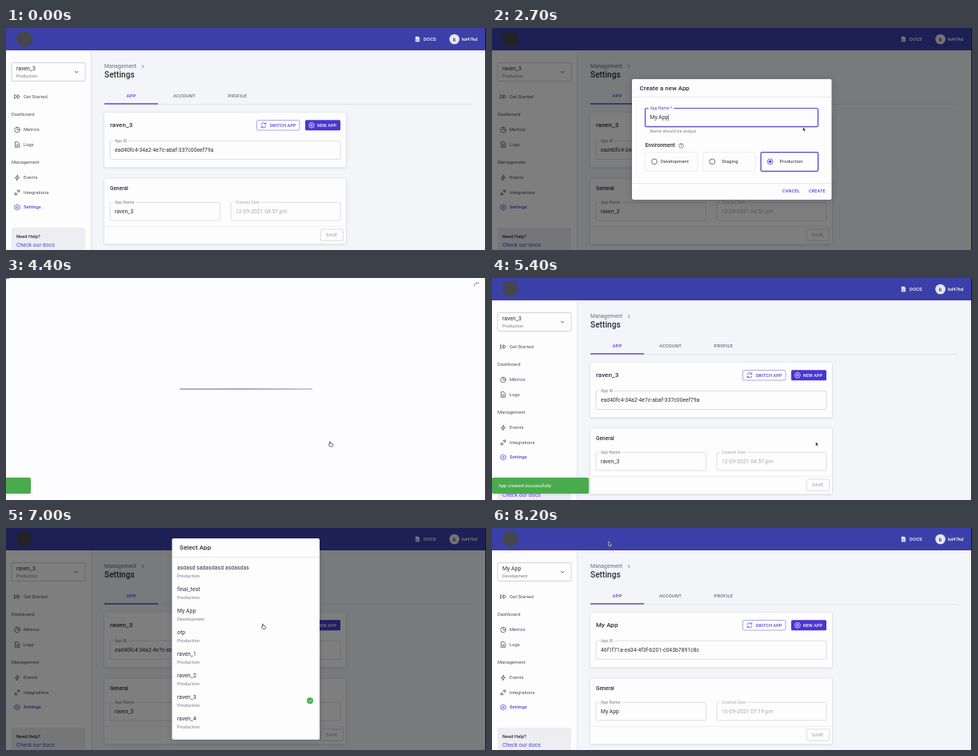
Recreate the animation shown at these times as an HTML page with a canvas. Size 600 by 278 pixels, loop 8.3 s.

```html
<!DOCTYPE html>
<html lang="en">
<head>
<meta charset="utf-8">
<title>App settings</title>
<style>
  html, body { margin: 0; width: 100%; height: 100%; overflow: hidden; background: #f4f5f8; }
  canvas { display: block; width: 600px; height: 278px; }
</style>
</head>
<body>
<canvas></canvas>
<script>
const LOOP = 8300, STEP = 100;
const INK = '#2b2d38', GREY = '#777a84', PALE = '#a9abb3', LINE = '#c9cad0', PURPLE = '#5443d6';
const canvas = document.querySelector('canvas');
const ctx = canvas.getContext('2d');
const ratio = window.devicePixelRatio || 1;
canvas.width = 600 * ratio;
canvas.height = 278 * ratio;
ctx.scale(ratio, ratio);

const clamp = v => Math.max(0, Math.min(1, v));
const within = (t, from, to) => t >= from && t < to;

function box(x, y, x2, y2, fill, stroke, lineWidth = 0.6, radius = 1.5) {
  ctx.beginPath();
  ctx.roundRect(x, y, x2 - x, y2 - y, radius);
  if (fill) { ctx.fillStyle = fill; ctx.fill(); }
  if (stroke) { ctx.strokeStyle = stroke; ctx.lineWidth = lineWidth; ctx.stroke(); }
}

function rect(x, y, w, h, fill) {
  ctx.fillStyle = fill;
  ctx.fillRect(x, y, w, h);
}

function shadowed(draw, blur = 3) {
  ctx.save();
  ctx.shadowColor = 'rgba(40,40,80,.22)';
  ctx.shadowBlur = blur;
  ctx.shadowOffsetY = 0.6;
  draw();
  ctx.restore();
}

function text(s, x, y, size, color = INK, weight = 400, spacing = 0.01) {
  ctx.font = `${weight} ${size}px Roboto, sans-serif`;
  ctx.letterSpacing = size * spacing + 'px';
  ctx.textBaseline = 'middle';
  ctx.fillStyle = color;
  ctx.fillText(s, x, y);
  return ctx.measureText(s).width;
}

const caps = (s, x, y, size, color) => text(s, x, y, size, color, 500, 0.029);

function icon(d, x, y, color, fill, lineWidth = 0.75) {
  const path = new Path2D(d);
  ctx.save();
  ctx.translate(x, y);
  if (fill) { ctx.fillStyle = fill; ctx.fill(path); }
  if (color) { ctx.strokeStyle = color; ctx.lineWidth = lineWidth; ctx.stroke(path); }
  ctx.restore();
}

function disc(x, y, r, fill, stroke, lineWidth = 0.8) {
  ctx.beginPath();
  ctx.arc(x, y, r, 0, 7);
  if (fill) { ctx.fillStyle = fill; ctx.fill(); }
  if (stroke) { ctx.strokeStyle = stroke; ctx.lineWidth = lineWidth; ctx.stroke(); }
}

// Outlined text field with its label set into the top border
function field(label, value, x, y, x2, y2, { color = INK, focus = false } = {}) {
  box(x, y, x2, y2, null, focus ? PURPLE : LINE, focus ? 1.2 : 0.6);
  ctx.font = '400 5px Roboto, sans-serif';
  ctx.letterSpacing = '0.1px';
  rect(x + 4, y - 1.5, ctx.measureText(label).width + 4, 3, '#fdfdfe');
  text(label, x + 6, y, 5, focus ? PURPLE : color === INK ? GREY : PALE, 400, 0.02);
  return text(value, x + 6, (y + y2) / 2 + 0.4, 6.7, color);
}

const RING = 'M3.3 0A3.3 3.3 0 1 1 -3.3 0A3.3 3.3 0 1 1 3.3 0';
const ICONS = {
  start: 'M-3.5 -2.5L-.3 0L-3.5 2.5ZM.3 -2.5L3.5 0L.3 2.5Z',
  metrics: RING + 'M0 -3.3V0H3.3',
  logs: 'M-2.6 -3.3H1L2.6 -1.5V3.3H-2.6ZM-1.3 0H1.3M-1.3 1.6H1.3',
  events: 'M.8 -3.5L-2.7 .6H0L-.8 3.5L2.7 -.6H0Z',
  links: 'M-3.5 2.6L-1.5 .7M3.5 -2.6L1.5 -.7M-2 .2L.2 2.2L-1 3H-2.5L-2.8 1ZM2 -.2L-.2 -2.2L1 -3H2.5L2.8 -1Z',
  gear: 'M0 -3.6L1.4 -2.7L3.2 -1.8V1.8L1.4 2.7L0 3.6L-1.4 2.7L-3.2 1.8V-1.8L-1.4 -2.7ZM1.2 0A1.2 1.2 0 1 1 -1.2 0A1.2 1.2 0 1 1 1.2 0',
  sync: 'M-3 -.5A3 3 0 0 1 2.4 -1.8M3 .5A3 3 0 0 1 -2.4 1.8M2.8 -3.4V-1.5H.8M-2.8 3.4V1.5H-.8',
  plus: RING + 'M-1.8 0H1.8M0 -1.8V1.8',
  down: 'M-2.2 -1L0 1.2L2.2 -1',
  right: 'M-1 -2L1 0L-1 2',
  tick: 'M-1.7 0L-.4 1.3L1.8 -1.1'
};

const NAV = [
  ['Get Started', 86, 'start'], ['Dashboard', 108], ['Metrics', 127.5, 'metrics'], ['Logs', 146, 'logs'],
  ['Management', 168.5], ['Events', 187.5, 'events'], ['Integrations', 206, 'links'], ['Settings', 224.5, 'gear']
];

const APPS = {
  old: { name: 'raven_3', env: 'Production', id: 'ead40fc4-34a2-4e7c-abaf-337c00eef79a', date: '12-09-2021 04:57 pm' },
  fresh: { name: 'My App', env: 'Development', id: '46f1f71a-ea34-4f3f-b201-c043b7891c8c', date: '16-09-2021 07:19 pm' }
};

function drawHeader() {
  rect(0, 0, 600, 28, '#3b40a9');
  disc(23, 13.5, 10, '#45464e');
  icon('M-2.6 -3.4H1L2.8 -1.6V3.4H-2.6ZM-1.3 .1H1.4M-1.3 1.6H1.4', 514.3, 14, '#3b40a9', '#fff', 0.6);
  caps('DOCS', 522, 14.3, 5.8, '#fff');
  disc(560.5, 14, 6.3, '#e6e6ee');
  text('k', 558.4, 14.2, 8, '#333645');
  text('kd47kd', 570, 14.3, 5.8, '#fff', 500);
}

function drawSidebar(app) {
  shadowed(() => rect(0, 28, 106, 250, '#fdfdfe'), 2);
  box(7, 43.5, 99, 66.5, null, LINE, 0.8);
  text(app.name, 13, 50.8, 6.8);
  text(app.env, 13, 60, 5.2, GREY, 400, 0.02);
  icon(ICONS.down, 88, 55, '#555862', null, 0.9);
  for (const [label, y, name] of NAV) {
    const color = label === 'Settings' ? PURPLE : '#4b4e59';
    if (name) icon(ICONS[name], 14, y, color);
    text(label, name ? 22 : 7, y, 5.8, color, label === 'Settings' ? 500 : 400);
  }
  box(7, 250, 99, 284, '#ededf2');
  text('Need Help?', 13, 261.7, 5.7, INK, 500);
  text('Check our docs', 13, 271.8, 6.8, PURPLE);
}

function drawPage(app) {
  rect(0, 0, 600, 278, '#f4f5f8');
  drawSidebar(app);
  drawHeader();

  text('Management', 123, 48.3, 6.7, '#5d7180');
  icon(ICONS.right, 171, 48.2, '#4f8078', null, 0.9);
  text('Settings', 123, 59.5, 10, INK, 500);
  caps('APP', 150.5, 85.3, 5.8, PURPLE);
  caps('ACCOUNT', 209, 85.3, 5.8, '#6d707a');
  caps('PROFILE', 277.5, 85.3, 5.8, '#6d707a');
  rect(123, 95, 460, 0.6, '#d9dae0');
  rect(123, 94.2, 67, 1.4, PURPLE);

  shadowed(() => box(123, 106, 425, 174.5, '#fdfdfe'));
  text(app.name, 130, 121.8, 8, INK, 500);
  box(313.5, 115.5, 367, 128, null, '#8f86df', 0.7);
  icon(ICONS.sync, 322, 121.8, PURPLE);
  caps('SWITCH APP', 329.5, 122, 5.3, PURPLE);
  box(374, 115.3, 418, 128.2, '#4836d2');
  icon(ICONS.plus, 382, 121.8, '#fff');
  caps('NEW APP', 389, 122, 5.3, '#fff');
  field('App ID', app.id, 130, 141.3, 418, 164.5);

  shadowed(() => box(123, 188.5, 425, 270.5, '#fdfdfe'));
  text('General', 130, 201, 6.5, INK, 500);
  field('App Name', app.name, 130, 218.3, 267.5, 241);
  field('Created Date', app.date, 281, 218.3, 418, 241, { color: PALE });
  rect(123, 248, 302, 0.6, '#e6e7eb');
  box(393.5, 252, 421.5, 266.5, null, LINE);
  caps('SAVE', 400, 259.5, 5.6, PALE);
}

// Backdrop plus a dialog, both faded by alpha
function modal(alpha, dim, draw) {
  if (alpha <= 0) return;
  ctx.save();
  ctx.globalAlpha = dim;
  rect(0, 0, 600, 278, '#000');
  ctx.globalAlpha = alpha;
  draw();
  ctx.restore();
}

function drawCreate(typed, picked, focus) {
  shadowed(() => box(175, 64, 424.5, 215, '#fdfdfe', null, 0, 2), 10);
  text('Create a new App', 184.5, 75.3, 7.8, INK, 500);
  rect(175, 86, 249.5, 0.6, '#dcdde2');
  const width = field('App Name *', typed, 191.5, 100.5, 407.5, 123.7, { focus });
  if (focus) rect(197.5 + width, 108, 0.6, 8.5, '#555862');
  text('Name should be unique', 197.5, 129, 5.2, GREY, 400, 0.03);
  text('Environment', 191.5, 147.5, 6.5, INK, 500);
  disc(236.5, 147.5, 2.9, null, '#555862', 0.6);
  text('?', 235.2, 147.7, 4.8, '#555862', 500);
  ['Development', 'Staging', 'Production'].forEach((label, i) => {
    const x = 191.5 + i * 72.3, on = label === picked;
    box(x, 155.7, x + (i < 2 ? 65.3 : 71.5), 179.3, null, on ? PURPLE : '#e2e3e8', on ? 1.3 : 0.6);
    disc(x + 11.5, 167.3, 3.4, null, on ? PURPLE : '#4b4e59');
    if (on) disc(x + 11.5, 167.3, 1.8, PURPLE);
    text(label, x + (i === 0 ? 19.5 : 23.5), 167.5, 5.8, INK, 400, 0.015);
  });
  rect(175, 194, 249.5, 0.6, '#dcdde2');
  caps('CANCEL', 363, 204.5, 5.5, PURPLE);
  caps('CREATE', 396, 204.5, 5.5, typed ? PURPLE : PALE);
}

const LIST = ['asdasd sadasdasd asdasdas', 'final_test', 'My App', 'otp', 'raven_1', 'raven_2', 'raven_3', 'raven_4'];

function drawSelect(current, hover, pressed) {
  shadowed(() => box(207.5, 13, 392, 265, '#fdfdfe', null, 0, 2), 10);
  text('Select App', 217, 25, 8, INK, 500);
  rect(207.5, 36.5, 184.5, 0.6, '#d5d6db');
  if (hover) rect(207.5, 95, 184.5, 27, 'rgba(0,0,0,.05)');
  if (pressed) rect(260, 95, 132, 27, 'rgba(0,0,0,.14)');
  LIST.forEach((name, i) => {
    const y = 50 + i * 27;
    text(name, 214, y, 6.7, INK, 400, 0.02);
    text(name === 'My App' ? 'Development' : 'Production', 214, y + 10.2, 5.6, GREY, 400, 0.02);
    if (name === current) {
      disc(380, y + 4.3, 4, '#4caf50');
      icon(ICONS.tick, 380, y + 4.3, '#fff');
    }
  });
}

function drawLoading() {
  rect(0, 0, 600, 278, '#fdfcfe');
  rect(0, 0, 4, 1, '#4d6fd0');
  icon('M-3.2 1A3.3 3.3 0 0 1 2.4 -2.3', 589, 9.5, '#5a78d6', null, 1);
  const shade = ctx.createLinearGradient(217, 0, 383, 0);
  shade.addColorStop(0, '#8d8a9c');
  shade.addColorStop(0.5, '#8478b4');
  shade.addColorStop(1, '#b3aad8');
  rect(217, 138.4, 166, 1.3, shade);
}

function drawToast(t) {
  let right = 129;
  if (t < 4600) right = t < 4500 ? 31 : 115;
  else if (t >= 5400) right = 129 * (1 - ((t - 5300) / 400) ** 2);
  shadowed(() => box(right - 121, 250, right, 270, '#4aab4e', null, 0, 2));
  text('App created successfully', right - 113, 260.2, 5.8, '#fff');
}

// Time, x, y
const POINTER = [
  [500, 440, 4], [1100, 390, 127], [2700, 390, 127], [3400, 224, 168], [3500, 224, 168],
  [3600, 265, 180], [3700, 321, 192], [4000, 406, 208], [5800, 406, 208], [6700, 323, 129],
  [6900, 323, 129], [7200, 320, 112], [7600, 320, 112], [7800, 302, 96], [8000, 302, 96], [8200, 147, 20]
];
const HAND = [[1100, 2700], [3300, 3600], [4000, 5000], [6600, 7700]];

function drawPointer(t) {
  if (t < 500 || within(t, 1800, 2700)) return;
  const next = POINTER.findIndex(p => p[0] > t);
  const b = POINTER.at(next), a = next > 0 ? POINTER[next - 1] : b;
  const k = b === a ? 1 : clamp((t - a[0]) / (b[0] - a[0]));
  const x = a[1] + (b[1] - a[1]) * k, y = a[2] + (b[2] - a[2]) * k;
  if (HAND.some(([from, to]) => within(t, from, to))) {
    icon('M-1.5 -3Q-.8 -3.6 -.3 -2.8V-1L2.2 -.5Q3 0 2.7 1.2L2 3H-1L-2.8 .6Q-2.8 -.3 -1.5 .3Z', x, y, '#333', '#fff', 0.7);
  } else {
    icon('M-1.4 -3L2.2 .8H.7L1.5 2.6L.5 3L-.3 1.3L-1.4 2.2Z', x, y, '#fff', '#111', 0.6);
  }
}

const KEYS = [1900, 2100, 2200, 2400, 2500, 2700];

function render(t) {
  const app = t < 7400 ? APPS.old : APPS.fresh;
  if (within(t, 4300, 4500)) drawLoading();
  else drawPage(app);

  if (within(t, 1300, 4300)) {
    const alpha = t < 1400 ? 0.45 : 1;
    const typed = 'My App'.slice(0, KEYS.filter(key => t >= key).length);
    modal(alpha, alpha * 0.5, () => drawCreate(typed, t < 3500 ? 'Production' : 'Development', t < 3500));
  }
  if (within(t, 6800, 7600)) {
    const opening = t < 6900 ? 0.45 : 1;
    const alpha = t < 7400 ? opening : t < 7500 ? 0.4 : 0.08;
    const dim = t < 7400 ? opening * 0.5 : t < 7500 ? 0.15 : 0.03;
    modal(alpha, dim, () => drawSelect(app.name, t >= 7100, t >= 7300));
  }
  if (within(t, 4400, 5700)) drawToast(t);
  drawPointer(t);
  rect(599, 0, 1, 278, '#15151a');
}

const begin = performance.now();
function tick() {
  const t = (performance.now() - begin) % LOOP;
  render(Math.floor(t / STEP) * STEP);
  requestAnimationFrame(tick);
}
tick();
</script>
</body>
</html>
```
